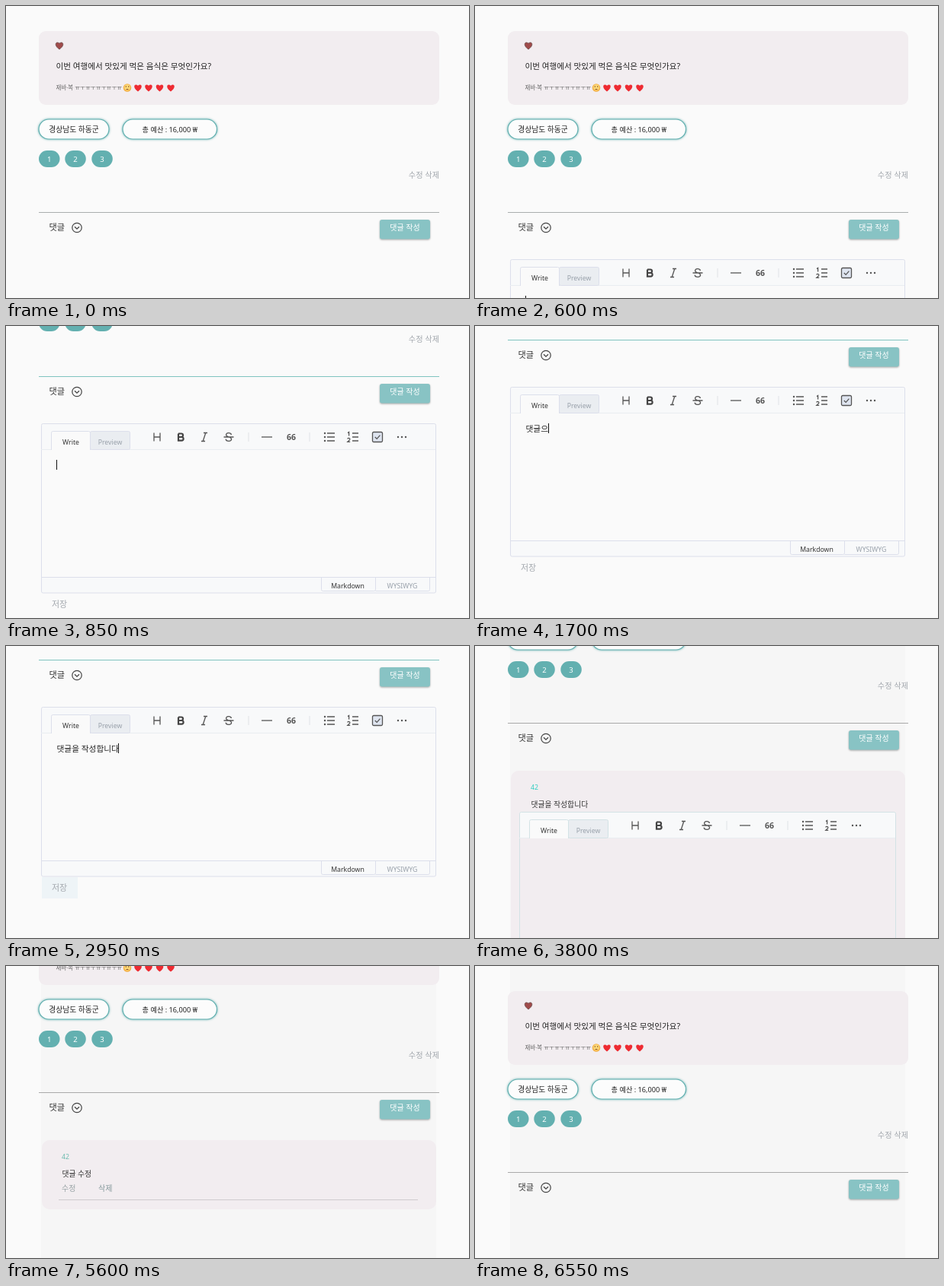
Recreate the animation shown at these times as an HTML page. Size 607x384 px, loop 7400 ms.

```html
<!DOCTYPE html>
<html lang="ko">
<head>
<meta charset="utf-8">
<title>댓글 작성</title>
<style>
  html, body { margin: 0; width: 100%; height: 100%; overflow: hidden; background: #fafafa; }
  svg { display: block; }
  text { font-family: "Noto Sans", "Noto Sans CJK KR", "Noto Sans CJK", sans-serif; white-space: pre; }
  .pill { filter: drop-shadow(0 0 1.5px #63b0b0); }
  .button { filter: drop-shadow(0 1px 1px #0005); }
</style>
</head>
<body>
<svg id="stage" width="607" height="384" viewBox="0 0 607 384"></svg>
<script>
const LOOP = 7400;
const TEAL = '#63b0b0', CARD = '#f2edf0', INK = '#222', GREY = '#a3a8ae';
const HEART = 'M0 5C-8-.5-4.5-6.5 0-2.8C4.5-6.5 8-.5 0 5Z';

// Each table holds [start time, value]; a value stays until the next row.
const scrollSteps = [[0, 0], [700, 10], [750, 44], [800, 122], [850, 205], [900, 253],
  [3000, 105], [3800, 170], [3850, 216], [3900, 258], [3950, 292], [4000, 318], [4100, 331],
  [5550, 105], [6550, 0]];
const newText = [[0, ''], [1100, 'ㄷ'], [1150, '대'], [1200, '댓'], [1350, '댓ㄱ'], [1400, '댓그'],
  [1500, '댓글'], [1600, '댓글ㅇ'], [1700, '댓글으'], [1750, '댓글을'], [1800, '댓글을 '],
  [1850, '댓글을 ㅈ'], [1900, '댓글을 자'], [1950, '댓글을 작'], [2000, '댓글을 작서'],
  [2050, '댓글을 작성'], [2150, '댓글을 작성ㅎ'], [2200, '댓글을 작성하'], [2250, '댓글을 작성합'],
  [2300, '댓글을 작성합ㄴ'], [2350, '댓글을 작성합니'], [2450, '댓글을 작성합니다']];
const editText = [[0, ''], [4350, 'ㄷ'], [4400, '대'], [4450, '댓'], [4550, '댓ㄱ'], [4650, '댓그'],
  [4750, '댓글'], [4800, '댓글 '], [4850, '댓글 ㅅ'], [4900, '댓글 수'], [4950, '댓글 숮'],
  [5000, '댓글 수저'], [5050, '댓글 수정']];
const buttonFill = [[0, '#88c3c4'], [250, '#9bcfd0'], [300, '#88c3c4']];
const lineFill = [[0, '#a9aeae'], [800, '#7fc4c0'], [3000, '#a9a9a9']];
const saveHover = [[0, 0], [2900, .5], [2950, 1]];
const idFill = [[0, '#6fbcb0'], [3300, '#35cfc2'], [4100, '#6fbcb0'], [5850, '#35cfc2']];
const editFill = [[0, '#98a3a5'], [3300, '#84989b'], [4100, '#98a3a5']];
const deleteFill = [[0, '#98a3a5'], [5400, '#84989b'], [5850, '#98a3a5'], [6400, '#6f8385']];

function pick(table, t) {
  let value = table[0][1];
  for (const [start, v] of table) if (start <= t) value = v;
  return value;
}

const label = (x, cy, s, size, fill, extra = '') =>
  `<text x="${x}" y="${cy + size * .37}" font-size="${size}" fill="${fill}" ${extra}>${s}</text>`;
const centred = (x, cy, s, size, fill, extra = '') =>
  label(x, cy, s, size, fill, 'text-anchor="middle" ' + extra);
const rect = (x, y, w, h, fill, extra = '') =>
  `<rect x="${x}" y="${y}" width="${w}" height="${h}" fill="${fill}" ${extra}/>`;
const path = (d, extra = '') => `<path d="${d}" ${extra}/>`;
const dots = points => points.map(([x, y]) =>
  `<circle cx="${x}" cy="${y}" r="1.2" fill="#555" stroke="none"/>`).join('');

const icons = {
  heading: path('M-4-5.5V5.5M4-5.5V5.5M-4 0H4'),
  bold: path('M-3-4.5H.8a2.2 2.2 0 0 1 0 4.5H-3M.8 0H1.3a2.3 2.3 0 0 1 0 4.6H-3V-4.5', 'stroke="#444" stroke-width="2.2"'),
  italic: path('M-1-5.5H4M-4 5.5H1M1.8-5.5L-1.8 5.5'),
  strike: path('M3.5-3C2.5-6.5-4-6-3.4-2.4C-3 0 3.6-.4 3.6 2.8C3.4 6.4-3.6 6-3.8 2.6M-6.5 0H6.5'),
  divider: path('M0-6V6', 'stroke="#dfe2e6" stroke-width="1"'),
  rule: path('M-7 0H7'),
  quote: `<g stroke="none">${centred(0, .5, '66', 10.5, '#555', 'font-weight="700"')}</g>`,
  bullets: path('M-3-5H7M-3 0H7M-3 5H7') + dots([[-6, -5], [-6, 0], [-6, 5]]),
  numbers: path('M-1-5H7M-1 0H7M-1 5H7') + path('M-7-5.5L-5.4-6.5V-1.5M-7.4 2.4C-6 .6-3.4 1.6-4.4 3.6L-7.2 6.4H-3.8'),
  check: rect(-6.5, -6.5, 13, 13, '#dfe5f0', 'rx="1.5"') + path('M-3.2 0L-.8 2.4L3.4-2.4'),
  more: dots([[-5, 0], [0, 0], [5, 0]])
};

function editor(id, x, y, right, border, names) {
  const w = right - x, edge = `stroke="${border}"`;
  const bar = names.map(([name, dx]) =>
    `<g transform="translate(${x + dx} ${y + 18})" fill="none" stroke="#555" stroke-width="1.3">${icons[name]}</g>`).join('');
  const foot = y + 202.5;
  return `<g id="${id}">` +
    rect(x + .5, y + .5, w, 34, '#f8f9fa') +
    rect(x + .5, foot, w, 20.5, '#f8f9fa') +
    rect(x + .5, y + .5, w, 222.5, 'none', `rx="2" ${edge}`) +
    path(`M${x} ${y + 34.5}H${right}`, 'stroke="#e9edf1"') +
    path(`M${x} ${foot}H${right}`, edge) +
    rect(x + 64.5, y + 10.5, 52, 24, '#eaedf1', `rx="2" ${edge}`) +
    path(`M${x + 13.5} ${y + 35}V${y + 12.5}q0-2 2-2H${x + 62.5}q2 0 2 2V${y + 35}`, `fill="#fafafa" ${edge}`) +
    centred(x + 39, y + 24.5, 'Write', 8.7, '#333') +
    centred(x + 90.5, y + 24.5, 'Preview', 8.7, '#98a0aa') +
    bar +
    path(`M${right - 149.5} ${foot}v16q0 2 2 2h67q2 0 2-2v-16M${right - 78.5} ${foot + 18}h69q2 0 2-2v-16`, `fill="none" ${edge}`) +
    centred(right - 115, y + 214, 'Markdown', 8.7, '#333') +
    centred(right - 43.5, y + 214, 'WYSIWYG', 8.7, '#98a0aa') +
    label(x + 20.5, y + 55, '', 10.7, INK, `id="${id}Text"`) +
    rect(x + 20, y + 48, 1, 13, '#111', `id="${id}Caret"`) + '</g>';
}

const tools = [['heading', 152], ['bold', 183], ['italic', 214], ['strike', 246], ['divider', 272],
  ['rule', 296], ['quote', 328], ['divider', 352], ['bullets', 378], ['numbers', 409]];

const heart = (x, y, extra) => path(HEART, `transform="translate(${x} ${y})" ${extra}`);
const pill = (x, w, s, size) =>
  rect(x, 149, w, 26, '#fcfcfc', `rx="13" stroke="${TEAL}" stroke-width="1.2" class="pill"`) +
  centred(x + w / 2, 162.5, s, size, INK);

const post =
  rect(43, 33, 525, 97, CARD, 'rx="9"') +
  heart(70, 52, 'fill="#a04b4b" stroke="#664848" stroke-width=".8" ') +
  label(65.5, 79, '이번 여행에서 맛있게 먹은 음식은 무엇인가요?', 10.6, INK) +
  label(65.5, 107.5, '재바·복 ㅠㅜㅠㅜㅠㅜㅠㅜㅠ', 7.5, '#666') +
  '<circle cx="159" cy="107.5" r="5.3" fill="#f4b24a"/>' +
  '<circle cx="159" cy="107" r="3.8" fill="#fbd977"/>' +
  path('M157.3 105.3v1.4M160.7 105.3v1.4M157.6 109.5h2.8', 'stroke="#8a4a26" stroke-width="1.1"') +
  [173, 187, 201.5, 216].map(x => heart(x, 107.5, 'fill="#ee2b32"')).join('') +
  pill(43, 92, '경상남도 하동군', 9.8) +
  pill(153, 123.5, '총 예산 : 16,000 ₩', 9.2) +
  [43, 77.3, 112.3].map((x, i) => rect(x, 190, 27.5, 22, TEAL, 'rx="11"') +
    centred(x + 13.7, 201.5, i + 1, 9.5, '#fff')).join('') +
  label(568, 222.5, '수정 삭제', 10.2, GREY, 'text-anchor="end"') +
  rect(43, 271, 525, 1, '#aaa', 'id="line"') +
  label(56.5, 291, '댓글', 11.2, '#333') +
  '<circle cx="93" cy="291.5" r="6.2" fill="none" stroke="#444" stroke-width="1.2"/>' +
  path('M90 290.2l3 3l3-3', 'fill="none" stroke="#444" stroke-width="1.3"') +
  rect(490, 281, 66, 25.5, '#88c3c4', 'rx="3" class="button" id="button"') +
  centred(523, 291.7, '댓글 작성', 10, '#fff');

const comment = '<g id="comment">' +
  rect(47, 334, 517, 91, CARD, 'rx="10" id="card"') +
  label(73, 355.5, '42', 8.8, '#6fbcb0', 'id="number"') +
  label(73.5, 378, '', 9.8, '#333', 'id="body"') +
  '<g id="footer">' +
  label(73, 397, '수정', 10, GREY, 'id="edit"') +
  label(121, 397, '삭제', 10, GREY, 'id="delete"') +
  rect(69, 412, 471, 1, '#cfcbce') + '</g></g>';

const stage = document.getElementById('stage');
stage.innerHTML = rect(46, 0, 518, 384, '#f6f6f6', 'id="tint"') +
  '<g id="page">' + post + comment +
  editor('write', 46, 333, 563, '#dcdfeb', [...tools, ['check', 441], ['more', 473]]) +
  editor('revise', 58, 388, 551, '#d3e2e5', [...tools, ['more', 442]]) +
  '<g id="save">' + rect(47, 557, 47, 28, '#eef4f7', 'id="hover"') +
  label(60, 570.5, '저장', 11, GREY) + '</g></g>';

const el = {};
stage.querySelectorAll('[id]').forEach(node => el[node.id] = node);
const show = (node, on) => node.setAttribute('display', on ? 'inline' : 'none');
const fill = (node, table, t) => node.setAttribute('fill', pick(table, t));
const between = (t, a, b) => t >= a && t < b;

function type(id, table, t, caretOn) {
  const text = el[id + 'Text'], caret = el[id + 'Caret'];
  text.textContent = pick(table, t);
  const width = text.textContent ? text.getComputedTextLength() : 0;
  caret.setAttribute('x', Math.round(+text.getAttribute('x') + width - .5));
  show(caret, caretOn);
}

function draw(t) {
  const writing = between(t, 600, 3000), revising = between(t, 3500, 5550);
  el.page.setAttribute('transform', `translate(0 ${-pick(scrollSteps, t)})`);
  show(el.tint, t >= 3000);
  show(el.write, writing);
  show(el.save, writing);
  show(el.revise, revising);
  show(el.comment, between(t, 3000, 6550));

  const grow = revising ? 226 : 0;
  el.card.setAttribute('height', 91 + grow);
  el.footer.setAttribute('transform', `translate(0 ${grow})`);
  el.body.textContent = t < 5550 ? '댓글을 작성합니다' : '댓글 수정';
  if (writing) type('write', newText, t, !between(t, 2700, 2900));
  if (revising) type('revise', editText, t, between(t, 4100, 5300));

  el.hover.setAttribute('opacity', pick(saveHover, t));
  fill(el.button, buttonFill, t);
  fill(el.line, lineFill, t);
  fill(el.number, idFill, t);
  fill(el.edit, editFill, t);
  fill(el.delete, deleteFill, t);
}

const start = performance.now();
function frame() {
  draw((performance.now() - start) % LOOP);
  requestAnimationFrame(frame);
}
frame();
</script>
</body>
</html>
```
